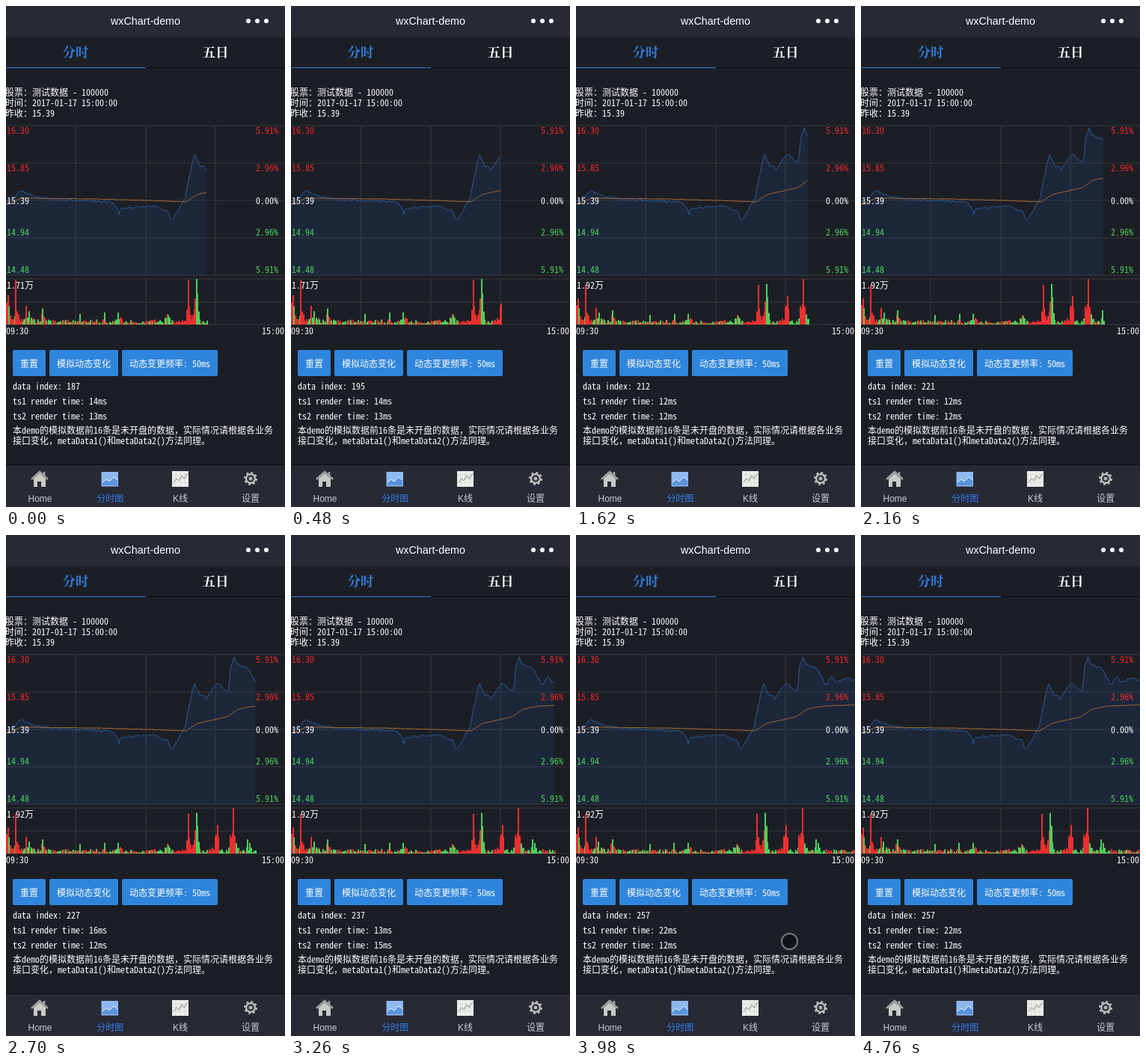
Animation, 373 px wide and 670 px high, one loop 5610 ms. Source, as an HTML page with a canvas:

```html
<!DOCTYPE html>
<html lang="zh">
<head>
<meta charset="utf-8">
<title>wxChart-demo</title>
<style>
  html, body { margin: 0; width: 100%; height: 100%; overflow: hidden; background: #1c1e26; }
  #stage { position: relative; width: 373px; height: 670px; overflow: hidden; color: #fff;
    font: 12px/14px "Noto Sans Mono CJK SC", "Noto Sans CJK SC", "Noto Sans CJK", monospace; }
  #stage > * { position: absolute; }
  #stage span { white-space: pre; }
  .bar { left: 0; width: 373px; background: #272934; }
  .button { top: 460px; height: 35px; border-radius: 2px; background: #2f85dc; line-height: 35px; text-align: center; white-space: pre; }
  .tab { font: 600 17.5px/24px "Noto Serif CJK SC", "Noto Sans CJK SC", "Noto Sans CJK", serif; }
  .nav { font: 12px/14px "Liberation Sans", "Noto Sans CJK SC", "Noto Sans CJK", sans-serif; }
  .title { font: 500 14.3px/18px "Liberation Sans", sans-serif; }
  .up { color: #f5282d; }
  .down { color: #4fd35f; }
  #cursor { width: 19px; height: 19px; border: 2px solid #77787c; border-radius: 50%; background: #111217; }
</style>
</head>
<body>
<div id="stage">
  <div class="bar" style="top:0;height:42px"></div>
  <div style="top:82px;left:0;width:187px;height:1px;background:#2f80d2"></div>
  <div style="top:82px;left:187px;width:186px;height:1px;background:#08090c"></div>
  <div class="bar" style="top:613px;height:57px;border-top:1px solid #0b0c10"></div>
  <canvas id="chart" width="373" height="670" style="left:0;top:0"></canvas>
  <div class="button" style="left:9px;width:44px">重置</div>
  <div class="button" style="left:58px;width:92px">模拟动态变化</div>
  <div class="button" style="left:155px;width:128px">动态变更频率: 50ms</div>
  <svg width="373" height="670" style="left:0;top:0">
    <g fill="#fff"><circle cx="324" cy="20" r="3"/><circle cx="336" cy="20" r="3"/><circle cx="348" cy="20" r="3"/></g>
    <path d="M37 632v11h5v-7h5v7h6v-11l-8-7z" fill="#c9c9c5"/>
    <path d="M34 633l11-10 11 10M51 623v6" fill="none" stroke="#a3a4a3" stroke-width="2.5"/>
    <rect x="127.5" y="623" width="22.5" height="19.5" fill="#8db9ef"/>
    <path d="M129 641v-4l5-4 4 3 6-6 5 4v7z" fill="#5b93dc"/>
    <path d="M129 637l5-4 4 3 6-6 5 4" fill="none" stroke="#e8f3ff"/>
    <rect x="222" y="622" width="22" height="21" fill="#eeeeea"/>
    <path d="M222 627h22M222 632h22M222 637h22M227 622v21M233 622v21M239 622v21" stroke="#dadad6"/>
    <path d="M224 637l4-5 3 3 4-7 3 4 5-7" fill="none" stroke="#8a8a88"/>
    <circle cx="327" cy="632" r="7" fill="#cfcfcd"/>
    <circle cx="327" cy="632" r="8" fill="none" stroke="#bdbdbb" stroke-width="2" stroke-dasharray="3.1 3.18"/>
    <circle cx="327" cy="632" r="5" fill="#3c3e43"/>
    <circle cx="327" cy="632" r="2.3" fill="#b7b8b8"/>
  </svg>
  <div id="cursor"></div>
</div>
<script>
const LOOP = 5610, WIDTH = 373, POINTS = 242, STEP = 1.556;
const stage = document.getElementById('stage');
const cursor = document.getElementById('cursor');
const ctx = document.getElementById('chart').getContext('2d');

// Text is placed by its vertical centre; align is the share of its width left of x.
function label(x, y, text, { cls = '', color = '', align = 0 } = {}) {
  const span = document.createElement('span');
  span.className = cls;
  span.textContent = text;
  span.style.cssText = `left:${x}px;top:${y}px;color:${color};transform:translate(${-100 * align}%,-50%)`;
  stage.insertBefore(span, cursor);
  return span;
}

label(186.5, 20, 'wxChart-demo', { cls: 'title', align: .5 });
label(93, 61, '分时', { cls: 'tab', color: '#347fdd', align: .5 });
label(280, 61, '五日', { cls: 'tab', align: .5 });
['股票：测试数据 - 100000', '时间：2017-01-17 15:00:00', '昨收：15.39']
  .forEach((text, i) => label(-1, 115 + 14 * i, text));
[['16.30', '5.91%', 166, 'up'], ['15.85', '2.96%', 216, 'up'], ['15.39', '0.00%', 260, ''],
 ['14.94', '2.96%', 302, 'down'], ['14.48', '5.91%', 352, 'down']]
  .forEach(([price, percent, y, cls]) => {
    label(1, y, price, { cls });
    label(364, y, percent, { cls, align: 1 });
  });
label(0, 434, '09:30');
label(372, 434, '15:00', { align: 1 });
label(9, 567, '本demo的模拟数据前16条是未开盘的数据，实际情况请根据各业务');
label(9, 581, '接口变化，metaData1()和metaData2()方法同理。');
['Home', '分时图', 'K线', '设置'].forEach((text, i) =>
  label(45.5 + 93.8 * i, 659, text, { cls: 'nav', align: .5, color: i === 1 ? '#347ff0' : '#cbcdd3' }));
const volumeLabel = label(1, 373, '');
const [indexLabel, firstLabel, secondLabel] = [508, 528, 548].map(y => label(9, y, ''));

function random(seed) {
  const v = Math.sin(seed * 12.9898 + 4.1) * 43758.5453;
  return v - Math.floor(v);
}

// Linear interpolation of [position, value] pairs.
function lerp(keys, p) {
  const i = keys.findIndex(k => k[0] >= p);
  if (i < 0) return keys[keys.length - 1][1];
  if (i === 0) return keys[0][1];
  const [a, u] = keys[i - 1], [b, v] = keys[i];
  return u + (v - u) * (p - a) / (b - a);
}

// Turning points of the curves; seeded noise fills in the small moves.
const priceTurns = [[0, 262], [12, 254], [20, 247], [34, 254], [60, 258], [140, 262], [147, 266], [151, 278],
  [154, 271], [195, 267], [216, 275], [221, 288], [229, 275], [240, 255], [247, 218], [252, 197], [258, 213],
  [268, 218], [282, 198], [293, 209], [298, 207], [300, 180], [305, 163], [310, 173], [324, 180], [336, 201],
  [343, 190], [350, 198], [361, 192], [375, 194]];
const averageTurns = [[0, 265], [20, 257], [120, 258], [190, 260], [240, 262], [256, 252], [296, 243],
  [310, 233], [330, 229], [375, 227]];

// Bursts of trading: position, peak volume, spread.
const bursts = [[2, 1.1, 14], [12, 1.67, 1], [27, .7, 9], [48, .6, 5], [98, .4, 3], [131, .45, 3], [150, .45, 5],
  [215, .4, 8], [243, 1.67, 4], [253, 1.71, 4], [281, 1.2, 5], [303, 1.92, 5], [322, .6, 8]];

function volumeAt(i) {
  const x = i * STEP;
  if (bursts.some(([centre]) => Math.round(centre / STEP) === i))
    return Math.max(...bursts.filter(b => Math.round(b[0] / STEP) === i).map(b => b[1]));
  const swell = Math.max(.2, ...bursts.map(([centre, peak, spread]) =>
    peak * Math.exp(-(((x - centre) / spread) ** 2))));
  return swell * (.15 + .8 * random(i + 500));
}

const indices = Array.from({ length: POINTS }, (_, i) => i);
const closes = indices.map(i => lerp(priceTurns, i * STEP) + (random(i) - .5) * 4);
const averages = indices.map(i => Math.round(lerp(averageTurns, i * STEP) * 2) / 2);
const volumes = indices.map(volumeAt);

function trace(values, count, step) {
  ctx.beginPath();
  for (let i = 0; i < count; i++) ctx.lineTo(i * step, values[i]);
}

function strokeCurve(values, count, step, color) {
  trace(values, count, step);
  ctx.strokeStyle = color;
  ctx.stroke();
}

function drawGrid() {
  ctx.beginPath();
  for (const y of [160, 210, 260, 310, 360, 365, 396, 426]) {
    ctx.moveTo(0, y);
    ctx.lineTo(WIDTH, y);
  }
  for (const x of [93, 187, 280]) {
    ctx.moveTo(x, 160);
    ctx.lineTo(x, 360);
    ctx.moveTo(x, 365);
    ctx.lineTo(x, 426);
  }
  ctx.strokeStyle = '#36383d';
  ctx.stroke();
}

function drawChart(count, step) {
  ctx.clearRect(0, 0, WIDTH, 670);
  drawGrid();
  trace(closes, count, step);
  ctx.lineTo((count - 1) * step, 360);
  ctx.lineTo(0, 360);
  ctx.fillStyle = 'rgba(45, 105, 195, .13)';
  ctx.fill();
  strokeCurve(closes, count, step, '#2c5d97');
  strokeCurve(averages, count, step, '#a56a35');

  const highest = Math.max(...volumes.slice(0, count));
  volumeLabel.textContent = `${highest.toFixed(2)}万`;
  for (let i = 0; i < count; i++) {
    const height = 61 * volumes[i] / highest;
    ctx.fillStyle = closes[i] <= closes[Math.max(0, i - 1)] ? '#ee2f30' : '#4fcf5c';
    ctx.fillRect(Math.round(i * step), 426 - height, 2, height);
  }
}

// Bursts of redraws: first time, last time, number of steps.
const steps = [[0, 600, 11], [660, 840, 4], [960, 1080, 3], [1200, 1620, 4], [1800, 2160, 4], [2340, 3070, 5],
  [3260, 3800, 10], [3860, 4340, 9], [4520, 4760, 5]]
  .flatMap(([from, to, n]) => Array.from({ length: n }, (_, i) => from + (to - from) * i / (n - 1)));

const FINISH = 3980;
const indexKeys = [[0, 187], [1020, 204], [1620, 212], [2700, 230], [3620, 243], [FINISH, 257]];
const renderTimes = [[0, 14, 13], [1380, 12, 12], [2520, 16, 12], [3260, 13, 15], [FINISH, 22, 12]];
const cursorX = [[3620, 262.5], [FINISH, 285.5], [4340, 300], [4520, 309], [4700, 354]];
const cursorY = [[3620, 541.5], [FINISH, 543.5], [4340, 543.5], [4520, 553], [4700, 655]];

function render(t) {
  const done = t >= FINISH;
  drawChart(done ? POINTS : 173 + Math.floor(t / 60), done ? WIDTH / (POINTS - 1) : STEP);

  const [, first, second] = renderTimes.filter(row => row[0] <= t).pop();
  indexLabel.textContent = `data index: ${Math.floor(lerp(indexKeys, t) + .001)}`;
  firstLabel.textContent = `ts1 render time: ${first}ms`;
  secondLabel.textContent = `ts2 render time: ${second}ms`;

  cursor.style.display = t >= 3500 && t < 4760 ? '' : 'none';
  cursor.style.left = `${lerp(cursorX, t) - 11.5}px`;
  cursor.style.top = `${lerp(cursorY, t) - 11.5}px`;
}

const start = performance.now();
let shown = -1;
function tick() {
  const t = (performance.now() - start) % LOOP;
  const current = steps.filter(s => s <= t + .5).pop();
  if (current !== shown) render(shown = current);
  requestAnimationFrame(tick);
}
tick();
</script>
</body>
</html>
```
